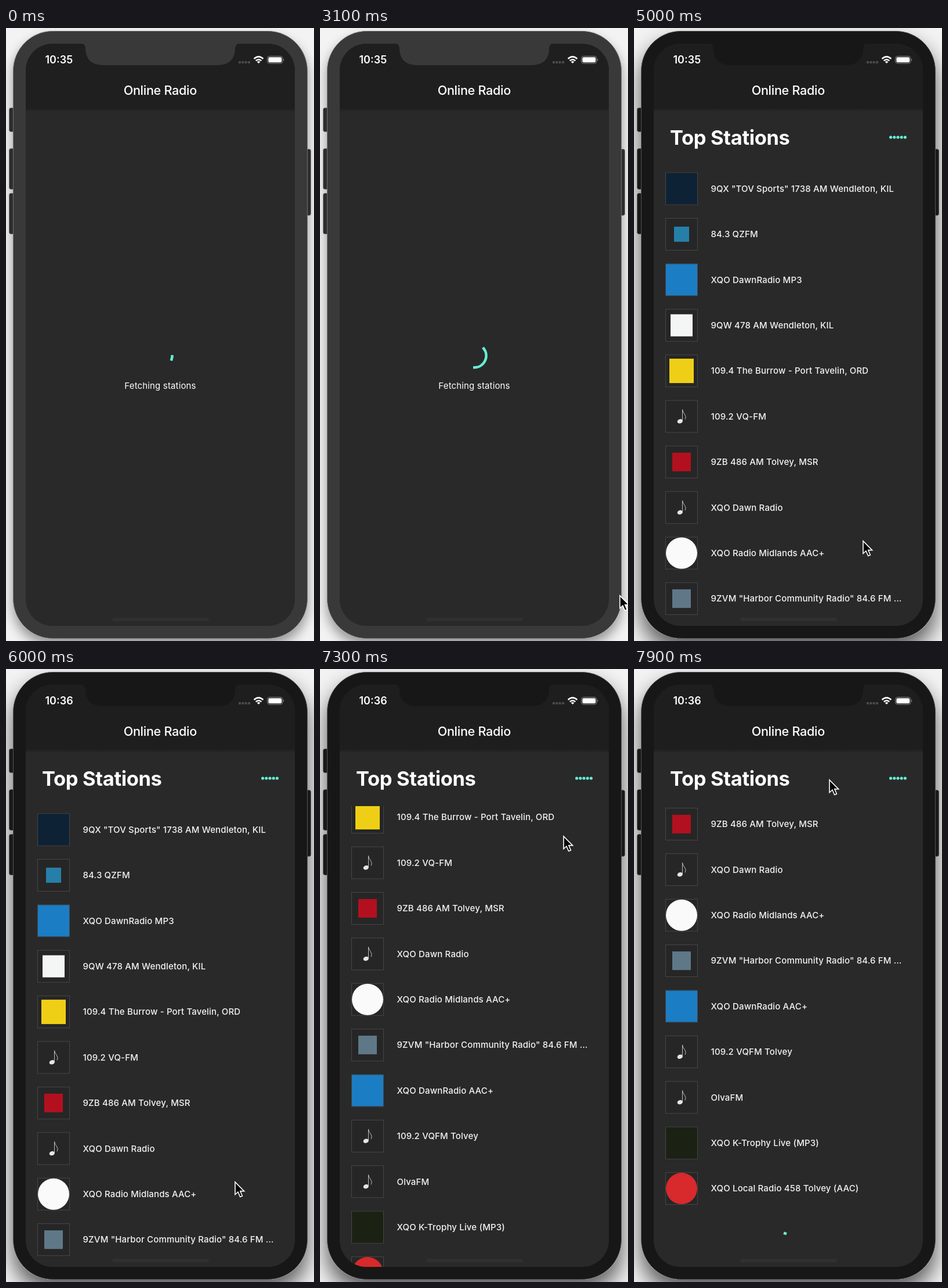
Write an HTML page that moves like this. It is 531 px wide and 1055 px high and loops after 8000 ms.

```html
<!DOCTYPE html>
<html lang="en">
<head>
<meta charset="utf-8">
<title>Online Radio</title>
<style>
  html, body { margin: 0; width: 100%; height: 100%; overflow: hidden; background: #f3f3f3; }
  svg { position: absolute; left: 0; top: 0; width: 531px; height: 1055px; }
  #shadow { position: absolute; left: 12px; top: 5px; width: 508px; height: 1046px; border-radius: 68px;
    box-shadow: 0 11px 20px rgba(0,0,0,.4); }
  .active #shadow { box-shadow: 0 20px 36px rgba(0,0,0,.64); }
  svg { --case: #393939; --edge: #707070; --key: #2d2d2d; --bar: #1f1f1f; }
  .active svg { --case: #171717; --edge: #545454; --key: #191919; --bar: #1e1e1e; }
  text { font-family: Inter, Roboto, "Liberation Sans", sans-serif; font-optical-sizing: none; fill: #fff; }
  .case { fill: var(--case); }
  .edge { stroke: var(--edge); }
  .key { fill: var(--key); stroke: var(--edge); stroke-width: .8; }
  .row { font-size: 15px; font-weight: 500; letter-spacing: .15px; fill: #f4f4f4; }
  .arc { fill: none; stroke: #66efd3; stroke-width: 4.5; stroke-linecap: square; }
</style>
</head>
<body>
<div id="shadow"></div>
<svg viewBox="0 0 531 1055">
  <defs>
    <clipPath id="screen"><rect x="34" y="27" width="464" height="1002" rx="46"/></clipPath>
    <clipPath id="listArea"><rect x="34" y="236" width="464" height="793"/></clipPath>
    <linearGradient id="fade" x2="0" y2="1">
      <stop stop-color="#000" stop-opacity=".22"/><stop offset="1" stop-color="#000" stop-opacity="0"/>
    </linearGradient>
  </defs>

  <g class="key">
    <rect x="5.5" y="137.5" width="12" height="41" rx="3"/>
    <rect x="5.5" y="207.5" width="12" height="70" rx="3"/>
    <rect x="5.5" y="284.5" width="12" height="70" rx="3"/>
    <rect x="514" y="208.5" width="11.5" height="114" rx="3"/>
  </g>
  <rect class="case edge" x="12.5" y="5.5" width="507" height="1045" rx="68"/>

  <g clip-path="url(#screen)">
    <rect x="34" y="27" width="464" height="1002" fill="#292929"/>
    <rect x="34" y="27" width="464" height="112" fill="var(--bar)"/>
    <rect x="34" y="139" width="464" height="5" fill="url(#fade)"/>

    <g id="loading">
      <path id="spin" class="arc"/>
      <text x="266" y="621" text-anchor="middle" font-size="15" letter-spacing=".15">Fetching stations</text>
    </g>

    <g id="stations">
      <text x="62" y="200.5" font-size="34.5" font-weight="700" letter-spacing="-.35">Top Stations</text>
      <g id="dots" fill="#66efd3"></g>
      <g clip-path="url(#listArea)"><g id="list"><path id="more" class="arc"/></g></g>
    </g>
    <rect x="183" y="1015" width="167" height="6" rx="3" fill="#303030"/>
  </g>

  <path class="case" d="M129 26Q137 27 137 36Q138 64 168 64H364Q394 64 395 36Q395 27 403 26Z"/>
  <text id="clock" x="67.5" y="61.2" font-size="18" font-weight="600"></text>
  <text x="265.8" y="115.3" text-anchor="middle" font-size="21.6" font-weight="500" letter-spacing="-.3">Online Radio</text>

  <g fill="#4b4b4b">
    <rect x="401" y="57" width="4" height="4" rx="1"/><rect x="406.3" y="57" width="4" height="4" rx="1"/>
    <rect x="411.6" y="57" width="4" height="4" rx="1"/><rect x="417" y="57" width="4" height="4" rx="1"/>
  </g>
  <g fill="none" stroke="#fff" stroke-width="2.5">
    <path d="M427.6 53Q435.5 45.7 443.4 53M430.7 56.4Q435.5 52 440.3 56.4"/>
    <path d="M432.7 58.2Q435.5 56 438.3 58.2L435.5 61Z" fill="#fff" stroke="none"/>
  </g>
  <rect x="450.5" y="48.5" width="26.5" height="12.5" rx="4" fill="none" stroke="#858585"/>
  <rect x="452.3" y="50.3" width="23" height="9" rx="2.4" fill="#fff"/>
  <path d="M478.2 52.6Q480.4 54.7 478.2 57Z" fill="#858585"/>

  <path id="cursor" d="M1 2V23.5L6 19L9.7 27.5L13.4 26L9.8 17.6H16.6Z" fill="#000" stroke="#fff" stroke-width="1.6"/>
</svg>

<script>
const $ = id => document.getElementById(id);
const LOOP = 8000, PITCH = 78.4, MID = 276.5;
const ACTIVE_AT = 3300, LIST_AT = 3600, MINUTE_AT = 5500, MORE_AT = 6960;

// name, artwork colour, artwork size, round?  (no colour: music note)
const stations = [
  ['9QX "TOV Sports" 1738 AM Wendleton, KIL', '#0d2235', 54],
  ['84.3 QZFM', '#267fa8', 26],
  ['XQO DawnRadio MP3', '#1b7dc4', 54],
  ['9QW 478 AM Wendleton, KIL', '#f4f5f5', 38],
  ['109.4 The Burrow - Port Tavelin, ORD', '#efcf16', 42],
  ['109.2 VQ-FM'],
  ['9ZB 486 AM Tolvey, MSR', '#b3101f', 32],
  ['XQO Dawn Radio'],
  ['XQO Radio Midlands AAC+', '#fafafa', 54, true],
  ['9ZVM "Harbor Community Radio" 84.6 FM …', '#5f7888', 32],
  ['XQO DawnRadio AAC+', '#1b7dc4', 54],
  ['109.2 VQFM Tolvey'],
  ['OlvaFM'],
  ['XQO K-Trophy Live (MP3)', '#1b2214', 54],
  ['XQO Local Radio 458 Tolvey (AAC)', '#d8292c', 54, true]
];

const note = `<ellipse cx="-2.7" cy="8.3" rx="4.7" ry="3.6" transform="rotate(-18 -2.7 8.3)" fill="#e6e6e6"/>
  <path d="M1.5 7.5V-12Q2.2 -7 5.2 -4Q8.7 0 6.2 5" fill="none" stroke="#bdbdbd"/>`;

const art = (color, size, round) => color
  ? `<rect x="${-size / 2}" y="${-size / 2}" width="${size}" height="${size}" rx="${round ? size / 2 : 0}" fill="${color}"/>`
  : note;

$('list').insertAdjacentHTML('afterbegin', stations.map(([name, ...look], i) =>
  `<g transform="translate(82 ${MID + i * PITCH})">
    <rect x="-27.5" y="-27.5" width="55" height="55" fill="#262626" stroke="#464646"/>${art(...look)}
    <text class="row" x="50.5" y="5.2">${name}</text></g>`).join(''));

$('dots').innerHTML = [0, 1, 2, 3, 4].map(i => `<circle cx="${442.6 + i * 6.2}" cy="188" r="2.6"/>`).join('');

// [time, values...] keys with linear steps between them
const pointer = [
  [400, 532, 98], [900, 489, 628], [1200, 470, 765], [1500, 462, 848], [1800, 472, 898], [2400, 516, 975],
  [4200, 516, 975], [4500, 478, 950], [4900, 396, 885], [5000, 394, 881], [6000, 394, 881], [6300, 394, 622],
  [6600, 402, 532], [7000, 415, 352], [7300, 419, 286], [7900, 336, 189]
];
const scrolling = [[6300, 0], [6600, 90], [7000, 270], [7300, 335], [7700, 480]];

function track(keys, t) {
  const next = keys.findIndex(k => k[0] > t);
  if (next < 0) return keys.at(-1).slice(1);
  if (next === 0) return keys[0].slice(1);
  const a = keys[next - 1], b = keys[next], u = (t - a[0]) / (b[0] - a[0]);
  return a.slice(1).map((v, i) => v + (b[i + 1] - v) * u);
}

// cubic-bezier(.4, 0, .2, 1)
function ease(x) {
  if (x <= 0) return 0;
  if (x >= 1) return 1;
  let lo = 0, hi = 1, s;
  for (let i = 0; i < 24; i++) {
    s = (lo + hi) / 2;
    const r = 1 - s;
    if (1.2 * s * r * r + .6 * s * s * r + s ** 3 < x) lo = s; else hi = s;
  }
  return 3 * s * s - 2 * s ** 3;
}

// Ring segment whose head runs ahead for half a cycle, then the tail catches up
function ring(cx, cy, cycle) {
  const step = Math.floor(cycle), p = cycle - step, r = 20.2;
  const head = ease(p * 2), tail = ease(p * 2 - 1);
  const start = -90 + tail * 270 + p * 306 - step * 144;
  const sweep = Math.max((head - tail) * 270, .1);
  const at = deg => {
    const a = deg * Math.PI / 180;
    return `${cx + r * Math.cos(a)} ${cy + r * Math.sin(a)}`;
  };
  return `M${at(start)}A${r} ${r} 0 ${sweep > 180 ? 1 : 0} 1 ${at(start + sweep)}`;
}

const show = (id, on) => { $(id).style.display = on ? '' : 'none'; };

function draw(now) {
  const t = Math.floor(now % LOOP / 100) * 100;
  document.body.className = t >= ACTIVE_AT ? 'active' : '';
  show('loading', t < LIST_AT);
  show('stations', t >= LIST_AT);
  show('more', t >= MORE_AT);
  show('cursor', t >= pointer[0][0]);
  $('clock').textContent = t < MINUTE_AT ? '10:35' : '10:36';
  $('spin').setAttribute('d', ring(266.3, 564, 2.07 + t / 1000));
  $('more').setAttribute('d', ring(266.3, 1432, Math.max(0, t - MORE_AT) / 1000));
  $('list').setAttribute('transform', `translate(0 ${-track(scrolling, t)[0]})`);
  $('cursor').setAttribute('transform', `translate(${track(pointer, t).join(' ')})`);
}

const begin = performance.now();
(function frame() {
  draw(performance.now() - begin);
  requestAnimationFrame(frame);
})();
</script>
</body>
</html>
```
